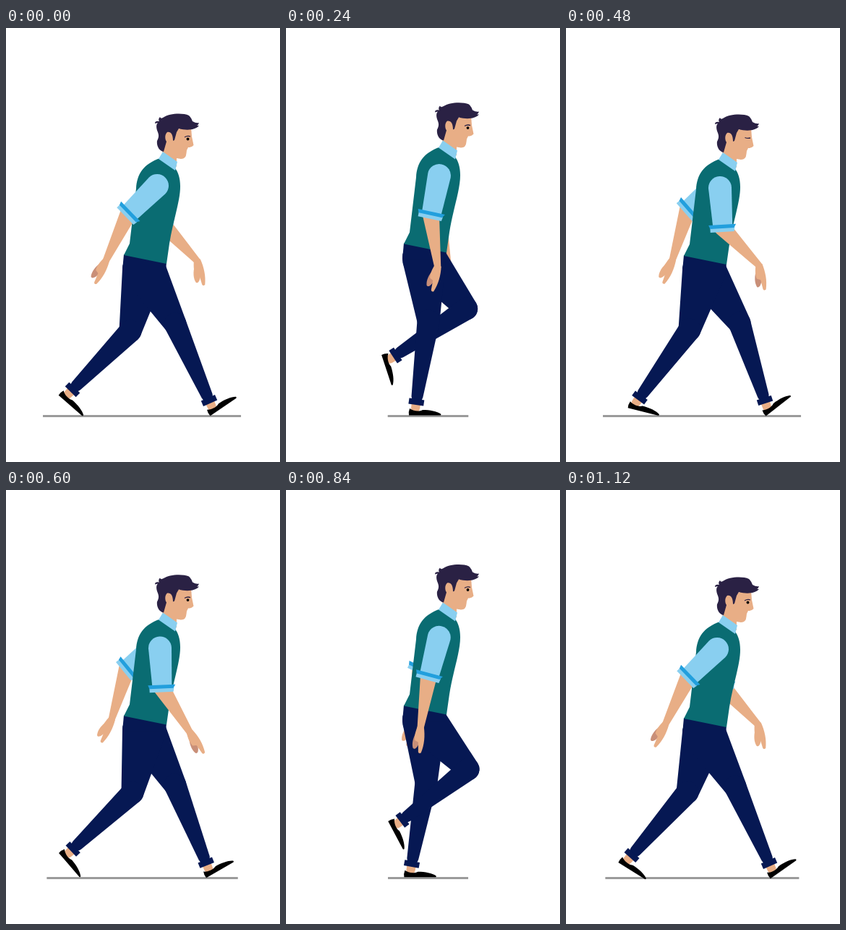
An HTML page for the animation above (1.16 s loop, 379 px wide and 600 px high).

```html
<!DOCTYPE html>
<html lang="en">
<head>
<meta charset="utf-8">
<title>Walk cycle</title>
<style>
  html, body { margin: 0; width: 100%; height: 100%; overflow: hidden; background: #fff; }
  svg { display: block; width: 100%; height: 100%; }
  .skin { fill: #e8ae86; }
  .thumb { fill: #c98f78; }
  .navy { fill: #061853; }
  .vest { fill: #0a6c72; }
  .shirt { fill: #89cff0; }
  .band { fill: #229fdd; }
  .hair { fill: #2a2144; }
</style>
</head>
<body>
<svg viewBox="0 0 379 600">
  <defs>
    <g id="sleeve">
      <path class="shirt" d="M-16,0A16,16 0 0 1 16,0L14,53H-13Z"/>
      <path class="shirt" d="M-17,55H17L16,61H-17Z"/>
      <path class="band" d="M-19,51H19L16,56H-17Z"/>
    </g>
    <path id="hand" d="M-4.5,-2C-6,6 -7,12 -5,18L0,20L2,33Q3,36 6,34C9,22 8,10 4.5,-2Z"/>
    <path id="finger" d="M-4.5,6C-8,14 -9,23 -6,29C-3,32 1,26 2,17Z"/>
    <path id="shoe" d="M-8,0C-4,3 4,5 10,2C20,2 30,4 35,7.5Q36,9.5 34,9.5H-9Q-10,5 -8,0Z"/>
  </defs>
  <rect id="ground" y="535" height="3" fill="#9b9b9b"/>
  <g id="farArm"></g>
  <g id="farLeg"></g>
  <g id="nearLeg"></g>
  <g id="body">
    <path class="navy" d="M163,313L222,324L221,335H161Z"/>
    <path class="skin" d="M220,142L256,137L257,150L259.5,162Q257,165 252,165L250,169L249.500,173Q249,181 242,181L236,180V192L216,175Z"/>
    <path class="hair" d="M218,171C212,170 208,163 209,156C211,152 212,149 210,144C207,137 208,133 210,131L206,132Q206,128 212,129Q210,126 213,123Q214,126 217,124C226,118 244,117 253,121Q257,125 258,129Q263,132 267,131Q266,134 264,135L267,135C262,141 250,142 239,139L236,144L233,155L231,156C231,147 228,143 223,144C219,148 220,154 222,157Z"/>
    <path class="vest" d="M213,180C190,188 181,202 180,222L171,298L163,314L222,326L226,298C231,266 241,240 241,219C241,207 238,199 234,194Z"/>
    <path class="shirt" d="M217,171L211,181L234,197L237,185Z"/>
    <g id="eyeOpen">
      <circle cx="251.500" cy="153.500" r="1.900"/>
      <path d="M247,151Q251,148.500 255,150" fill="none" stroke="#2a2144" stroke-width="1.300"/>
    </g>
    <path id="eyeShut" d="M247.500,150.500Q251,152 255,151" fill="none" stroke="#2a2144" stroke-width="1.300"/>
  </g>
  <g id="nearArm"></g>
</svg>
<script>
const LOOP = 1160, STEP = LOOP / 2, TICK = 40;
const $ = id => document.getElementById(id);
const mod = (v, n) => ((v % n) + n) % n;
const rad = deg => deg * Math.PI / 180;

// Periodic monotone cubic through the given keys.
function curve(period, times, values) {
  const n = times.length;
  const gap = i => i < n - 1 ? times[i + 1] - times[i] : period - times[n - 1] + times[0];
  const slope = i => (values[(i + 1) % n] - values[i]) / gap(i);
  const tangents = times.map((_, i) => {
    const j = mod(i - 1, n), a = slope(j), b = slope(i), ga = gap(j), gb = gap(i);
    if (a * b <= 0) return 0;
    const wa = 2 * gb + ga, wb = gb + 2 * ga;
    return (wa + wb) / (wa / a + wb / b);
  });
  return time => {
    const t = mod(time, period);
    let i = n - 1;
    while (i > 0 && times[i] > t) i--;
    const g = gap(i), u = (t - times[i]) / g, k = (i + 1) % n;
    const u2 = u * u, u3 = u2 * u;
    return (2 * u3 - 3 * u2 + 1) * values[i] + (u3 - 2 * u2 + u) * g * tangents[i]
      + (3 * u2 - 2 * u3) * values[k] + (u3 - u2) * g * tangents[k];
  };
}

const stepTimes = [0, 100, 160, 260, 360, 480, 540];
const bob = curve(STEP, stepTimes, [0, -9, -14, -15.5, -9.5, 1, 2]);
const groundWidth = curve(STEP, stepTimes, [274, 158, 123, 111, 207, 274, 268]);

const legTimes = [0, 100, 160, 260, 360, 480, 540, 580, 680, 740, 840, 940, 1060, 1120];
const legCurve = values => curve(LOOP, legTimes, values);
const leg = {
  kneeX: legCurve([234, 231, 217, 194, 187, 171, 168, 172, 195, 229, 252, 257, 240, 234]),
  kneeY: legCurve([409, 401, 411, 404, 408, 417, 418, 419, 411, 404, 386, 383, 408, 410]),
  cuffX: legCurve([281, 227, 206, 174, 142, 102, 91, 92, 98, 121, 161, 234, 275, 281]),
  cuffY: legCurve([515, 517, 517, 517, 517, 511, 505, 500, 474, 445, 456, 496, 515, 516]),
  foot: legCurve([-34, 0, 0, 0, 0, 14, 32, 41, 91, 99, 62, 0, -38, -35])
};

const armTimes = [0, 160, 360, 480, 680, 840, 1120];
const armCurves = (upper, fore, hand) =>
  [upper, fore, hand].map(values => curve(LOOP, armTimes, values));
const nearSwing = armCurves(
  [-46, -26, 3, 3.5, 1, -15, -46],
  [-25.5, -11, 36, 44, 19.5, -9, -26],
  [-32, -29, 0, 6, 36, -9, -32]);
const farSwing = armCurves(
  [5, 5, -19, -49, -51, -26, 6],
  [43, 29, -14, -17, -17, -8, 43],
  [8, 22, -25, -28, -32, -20, 8]);

// Outline of two circles joined by their outer tangents.
function limb(x1, y1, r1, x2, y2, r2) {
  const a = Math.atan2(y2 - y1, x2 - x1);
  const b = Math.acos((r1 - r2) / Math.hypot(x2 - x1, y2 - y1));
  const at = (x, y, r, t) => `${x + r * Math.cos(t)},${y + r * Math.sin(t)}`;
  return `M${at(x1, y1, r1, a + b)}A${r1},${r1} 0 1 1 ${at(x1, y1, r1, a - b)}`
    + `L${at(x2, y2, r2, a - b)}A${r2},${r2} 0 0 1 ${at(x2, y2, r2, a + b)}Z`;
}

const place = (x, y, deg) => `transform="translate(${x},${y}) rotate(${deg})"`;

function drawLeg(id, phase, hipY) {
  const [kx, ky, cx, cy, foot] =
    [leg.kneeX, leg.kneeY, leg.cuffX, leg.cuffY, leg.foot].map(f => f(phase));
  const dir = Math.atan2(cy - ky, cx - kx), ux = Math.cos(dir), uy = Math.sin(dir);
  const jx = cx + 9 * ux, jy = cy + 9 * uy;
  $(id).innerHTML = `
    <path class="skin" d="${limb(cx, cy, 6.5, jx, jy, 6)}"/>
    <use href="#shoe" ${place(jx, jy, foot)}/>
    <path class="navy" d="${limb(191, hipY, 30, kx, ky, 15.5)}"/>
    <path class="navy" d="${limb(kx, ky, 15.5, cx - 8 * ux, cy - 8 * uy, 8)}"/>
    <rect class="navy" x="-10.5" y="-4" width="21" height="8" ${place(cx, cy, dir * 180 / Math.PI - 90)}/>`;
}

function drawArm(id, swing, time, x, y, thumb) {
  const [upper, fore, hand] = swing.map(f => f(time));
  const ex = x + 55 * Math.sin(rad(upper)), ey = y + 55 * Math.cos(rad(upper));
  const wx = ex + 73 * Math.sin(rad(fore)), wy = ey + 73 * Math.cos(rad(fore));
  $(id).innerHTML = `
    <use href="#finger" class="${thumb}" ${place(wx, wy, -hand)}/>
    <use href="#hand" class="skin" ${place(wx, wy, -hand)}/>
    <path class="skin" d="${limb(ex, ey, 11.5, wx, wy, 4.5)}"/>
    <use href="#sleeve" ${place(x, y, -upper)}/>`;
}

function render(time) {
  const dy = bob(time), width = groundWidth(time);
  $("ground").setAttribute("x", 202.3 - 0.052 * width - width / 2);
  $("ground").setAttribute("width", width);
  $("body").setAttribute("transform", `translate(0,${dy})`);
  const blink = time >= 440 && time < 560;
  $("eyeOpen").setAttribute("visibility", blink ? "hidden" : "visible");
  $("eyeShut").setAttribute("visibility", blink ? "visible" : "hidden");
  drawArm("farArm", farSwing, time, 210, 214 + dy, "skin");
  drawLeg("farLeg", time + STEP, 334 + dy);
  drawLeg("nearLeg", time, 334 + dy);
  const back = Math.max(0, -nearSwing[0](time)) / 46;
  drawArm("nearArm", nearSwing, time, 213 - 4 * back, 220 - 2 * back + dy, "thumb");
}

const start = performance.now();
function tick() {
  const time = (performance.now() - start) % LOOP;
  render(Math.floor(time / TICK) * TICK);
  requestAnimationFrame(tick);
}
tick();
</script>
</body>
</html>
```
